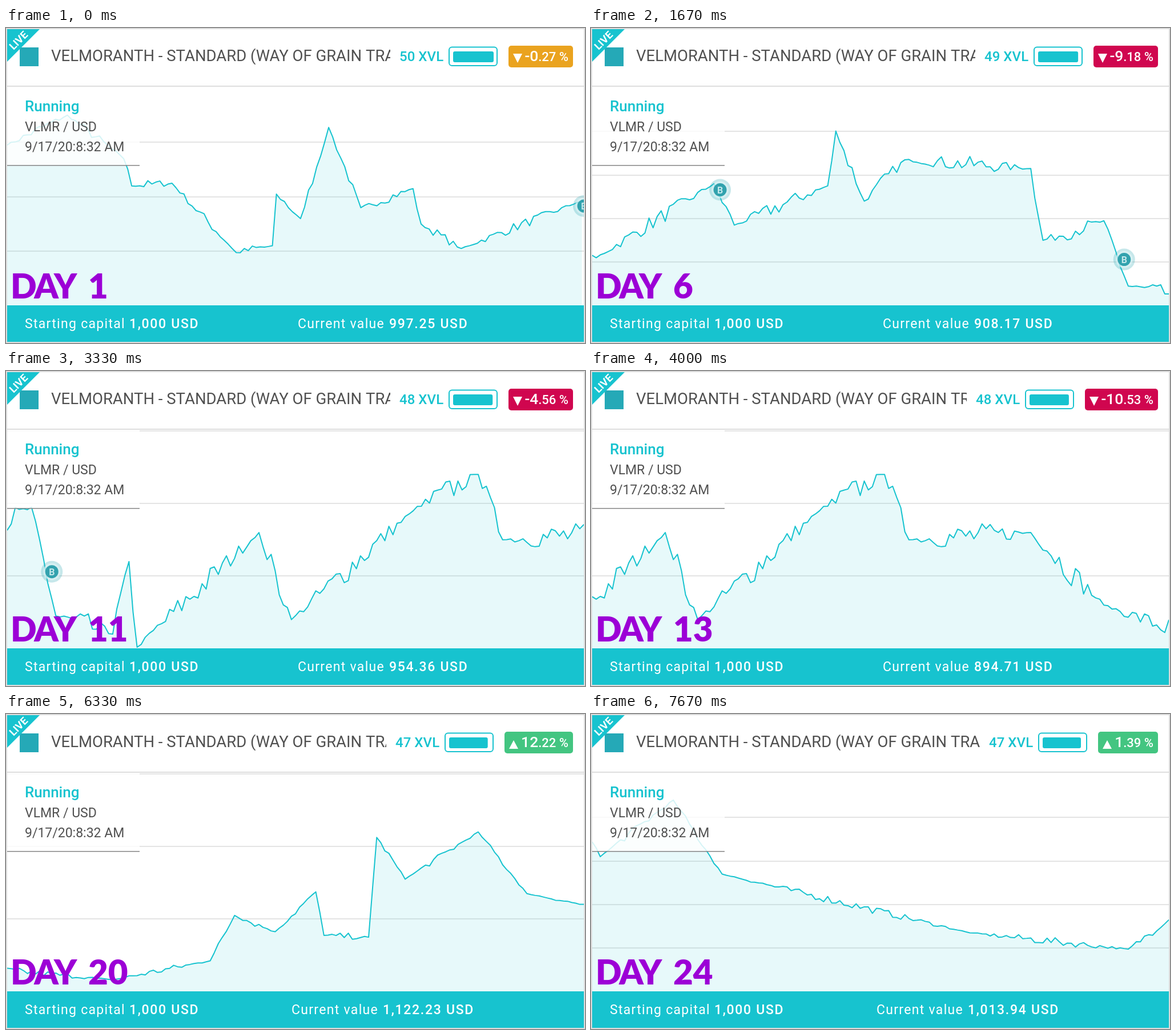
Recreate the animation shown at these times as an HTML page with a canvas. Size 1014 by 552 pixels, loop 8000 ms.

```html
<!DOCTYPE html>
<html lang="en">
<head>
<meta charset="utf-8">
<title>Live bot chart</title>
<style>
html, body { margin: 0; width: 100%; height: 100%; overflow: hidden; background: #fff; }
canvas { display: block; width: 100vw; height: 100vh; }
</style>
</head>
<body>
<canvas id="stage" width="1014" height="552"></canvas>
<script>
const ctx = document.getElementById('stage').getContext('2d');
const TEAL = '#17c3cf', GREY = '#505050', LOOP = 8000, DAYS = 24;
const LEFT = 2, RIGHT = 1012, TOP = 105, BOTTOM = 486.5;
const ROBOTO = 'Roboto, sans-serif';

// Turning points of the price: sample index, level.
const turns = [
  -1, 5.9, 14, 7, 28, 5.4, 30, 4.4, 40, 4.5, 56, 1.95, 65, 2.2, 66, 4.1,
  72, 3.2, 79, 6.55, 87, 3.6, 100, 4.3, 102, 3, 112, 2.1, 141, 3.8,
  146, 2.85, 169, 3.75, 171, 5.01, 178, 3.4, 188, 4.35, 219, 4.15,
  222, 2.5, 237, 2.95, 243, 1.45, 257, 1.2, 261, 2.2, 263, 1.02,
  293, 2.6, 301, 1.4, 331, 2.9, 347, 3.4, 353, 2.5, 383, 2.6, 401, 1.6,
  448, 0.65, 472, 1.7, 478, 4.2, 488, 3.3, 498, 5.5, 500, 3.1, 511, 3,
  513, 8.5, 520, 6.2, 538, 8.8, 550, 5.4, 611, 2.7, 650, 1.95, 660, 3.3
];
const values = [997.25, 978.1, 982.43, 1011.29, 913.62, 908.17, 923.84, 893.73,
  950.46, 1012.88, 954.36, 911.52, 894.71, 868.35, 897.06, 1040.95,
  1018.64, 1251.37, 1247.2, 1122.23, 1081.75, 971.84, 945.12, 1013.94];

const clamp = (v, lo, hi) => Math.min(hi, Math.max(lo, v));

let seed = 7;
function random() {
  seed = (seed * 16807) % 2147483647;
  return seed / 2147483647;
}

// Straight legs between the turning points, roughened in the middle.
const price = new Map();
for (let i = 0; i + 3 < turns.length; i += 2) {
  const [a, va, b, vb] = turns.slice(i, i + 4);
  for (let g = a; g <= b; g++) {
    const k = (g - a) / (b - a);
    const rough = (random() - 0.5) * 0.36 * Math.sin(Math.PI * k);
    price.set(g, va + (vb - va) * k + rough);
  }
}

// The window moves on by 24 samples a day, a little less in the middle.
function startOf(day) {
  const lag = 2 * clamp(day - 10, 0, 5) + 3.75 * clamp(day - 15, 0, 4);
  return Math.max(-1, Math.round(24 * day - 9 - lag));
}

function text(str, x, y, font, color, spacing = 0, align = 'left') {
  ctx.font = font;
  ctx.fillStyle = color;
  ctx.letterSpacing = spacing + 'px';
  ctx.textAlign = align;
  ctx.fillText(str, x, y);
}

function rect(x, y, w, h, color) {
  ctx.fillStyle = color;
  ctx.fillRect(x, y, w, h);
}

function round(x, y, w, h, r) {
  ctx.beginPath();
  ctx.roundRect(x, y, w, h, r);
}

function disc(x, y, r, color) {
  ctx.beginPath();
  ctx.arc(x, y, r, 0, Math.PI * 2);
  ctx.fillStyle = color;
  ctx.fill();
}

function triangle(ax, ay, bx, by, cx, cy, color) {
  ctx.beginPath();
  ctx.moveTo(ax, ay);
  ctx.lineTo(bx, by);
  ctx.lineTo(cx, cy);
  ctx.fillStyle = color;
  ctx.fill();
}

function axis(levels) {
  const min = Math.min(...levels), max = Math.max(...levels);
  const step = [1, 2, 4, 10].find(s => s >= (max - min) / 4);
  const low = Math.floor(min / step) * step;
  return { low, step, count: Math.ceil(max / step) - low / step };
}

function drawMarker(x, y) {
  disc(x, y, 19, 'rgba(50,170,178,0.28)');
  disc(x, y, 15, 'rgba(225,245,246,0.65)');
  disc(x, y, 11.5, '#32a2ae');
  text('B', x, y + 6, '700 16px ' + ROBOTO, '#c4e8eb', 0, 'center');
}

function drawChart(day) {
  const start = startOf(day), span = day ? 142 : 143.5;
  const last = Math.floor(start + span);
  const samples = [];
  for (let g = start; g <= last; g++) samples.push([g, price.get(g)]);
  const { low, step, count } = axis(samples.map(s => s[1]));
  const gap = (BOTTOM - TOP) / count;
  const px = g => LEFT + (g - start) * (RIGHT - LEFT) / span;
  const py = v => BOTTOM - (v - low) / step * gap;

  ctx.save();
  ctx.beginPath();
  ctx.rect(LEFT, 103, RIGHT - LEFT, 383);
  ctx.clip();

  for (let i = 1; i <= count; i++) {
    if (i < count || count === 3) {
      rect(LEFT, Math.round(BOTTOM - i * gap) - 1, RIGHT - LEFT, 2, '#e4e4e4');
    }
  }

  ctx.beginPath();
  samples.forEach(([g, v]) => ctx.lineTo(px(g), py(v)));
  ctx.strokeStyle = TEAL;
  ctx.lineWidth = 2;
  ctx.lineJoin = 'round';
  ctx.stroke();
  ctx.lineTo(px(last), BOTTOM);
  ctx.lineTo(LEFT, BOTTOM);
  ctx.fillStyle = 'rgba(23,195,207,0.1)';
  ctx.fill();

  drawMarker(px(142.5), py(3.66));
  drawMarker(px(242), py(2.06));
  ctx.restore();
}

function drawPanel() {
  rect(2, 103, 232, 137, 'rgba(255,255,255,0.82)');
  rect(2, 240, 232, 1.6, '#8c8c8c');
  text('Running', 33, 146, '500 26px ' + ROBOTO, TEAL);
  text('VLMR / USD', 33, 181, '23px ' + ROBOTO, GREY);
  text('9/17/20:8:32 AM', 33, 216, '23px ' + ROBOTO, GREY);
}

function drawBadge(x, pct) {
  const up = pct >= 0;
  round(x, 31, 993 - x, 38, 5);
  ctx.fillStyle = up ? '#43c581' : pct > -2.5 ? '#eaa31f' : '#d0064f';
  ctx.fill();
  const base = up ? 61 : 45, tip = up ? 46 : 61;
  triangle(x + 8, base, x + 24, base, x + 16, tip, '#fff');

  const [whole, cents] = pct.toFixed(2).split('.');
  const small = '.' + cents + ' %';
  text(small, 985, 58, '500 22px ' + ROBOTO, '#fff', 0, 'right');
  const edge = 985 - ctx.measureText(small).width;
  text(whole, edge, 58, '500 26.5px ' + ROBOTO, '#fff', 0, 'right');
}

function drawHeader(day) {
  const pct = (values[day] - 1000) / 10.001;
  const width = 105 + (pct < 0 ? 8 : 0) + (Math.abs(pct) >= 10 ? 15 : 0);
  const x = 993 - width;

  rect(2, 2, 1010, 99, '#fff');
  rect(2, 101, 1010, 2, '#dedede');
  rect(24, 34, 33, 33, '#25a9b7');
  triangle(2, 2, 59, 2, 2, 59, TEAL);
  ctx.save();
  ctx.translate(22, 22);
  ctx.rotate(-Math.PI / 4);
  text('LIVE', 0, 6, '700 18px ' + ROBOTO, '#fff', 0, 'center');
  ctx.restore();

  ctx.save();
  ctx.beginPath();
  ctx.rect(70, 20, x - 277, 60);
  ctx.clip();
  text('VELMORANTH - STANDARD (WAY OF GRAIN TRADING)', 79, 58, '27.5px ' + ROBOTO, GREY);
  ctx.restore();

  const credits = day < 2 ? 50 : day < 6 ? 49 : day < 17 ? 48 : 47;
  text(credits + ' XVL', x - 191, 58, '500 24px ' + ROBOTO, TEAL);
  round(x - 104, 33.5, 84, 32.5, 5);
  ctx.strokeStyle = TEAL;
  ctx.lineWidth = 2;
  ctx.stroke();
  round(x - 97, 41, 71 - day * 4 / 23, 19, 3);
  ctx.fillStyle = TEAL;
  ctx.fill();
  drawBadge(x, pct);
}

function drawFooter(day) {
  const thin = '23px ' + ROBOTO, bold = '500 23px ' + ROBOTO;
  const value = values[day];
  const amount = value.toLocaleString('en-US', { minimumFractionDigits: 2 });
  const x = value >= 1000 ? 500 : 511;
  rect(2, 486, 1010, 64, TEAL);
  text('Starting capital', 33, 526, thin, '#fff', 1.3);
  text('1,000 USD', 216, 526, bold, '#fff', 1.7);
  text('Current value', x, 526, thin, '#fff', 1.3);
  text(amount + ' USD', x + 160, 526, bold, '#fff', 1.7);
}

function drawDay(day) {
  const font = '900 60px Lato, sans-serif', color = '#9c00d6';
  text('DAY', 8, 474, font, color, -3);
  text(String(day + 1), 144, 474, font, color);
}

// Each day holds a third of a second, rounded to 10 ms.
function dayAt(t) {
  let day = 0;
  while (day < DAYS - 1 && t >= Math.round((day + 1) * 100 / 3) * 10) day++;
  return day;
}

function draw(day) {
  rect(0, 0, 1014, 552, '#dcdcdc');
  rect(2, 2, 1010, 548, '#fff');
  drawChart(day);
  drawPanel();
  drawHeader(day);
  drawFooter(day);
  drawDay(day);
}

const begin = performance.now();
function tick() {
  draw(dayAt((performance.now() - begin) % LOOP));
  requestAnimationFrame(tick);
}
tick();
</script>
</body>
</html>
```
